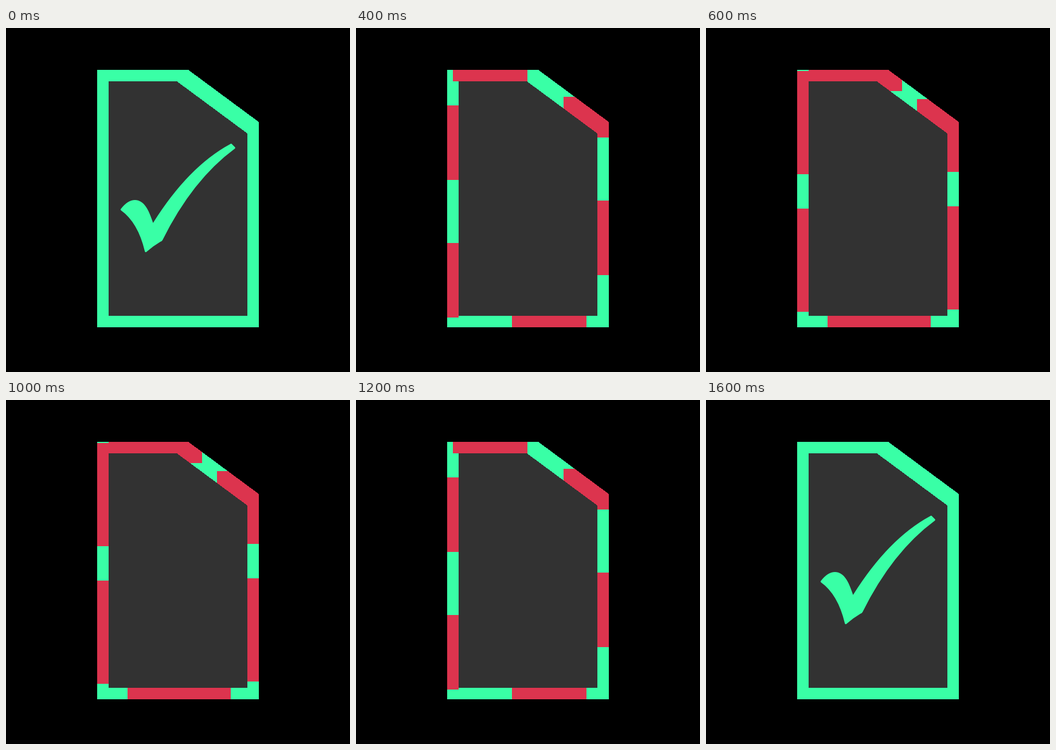
An HTML page with a canvas for the animation above (1.8 s loop, 600 by 600 pixels).

```html
<!DOCTYPE html>
<html lang="en">
<head>
<meta charset="utf-8">
<title>File check</title>
<style>
  html, body { margin: 0; width: 100%; height: 100%; overflow: hidden; background: #000; }
  canvas { display: block; }
</style>
</head>
<body>
<canvas id="stage" width="600" height="600"></canvas>
<script>
const ctx = document.getElementById('stage').getContext('2d');
const GREEN = '#39ffa6', RED = '#dc344e', PAPER = '#323232';
const STEP = 200, STEPS = 9, PERIOD = 240, BRUSH = 20;

const corners = [[169, 83], [308, 83], [431, 174], [431, 512], [169, 512], [169, 83]];

// Centre points of the outline, one per unit of horizontal plus vertical travel
const track = [];
for (let i = 0; i < corners.length - 1; i++) {
  const [x, y] = corners[i];
  const dx = corners[i + 1][0] - x, dy = corners[i + 1][1] - y;
  const n = Math.abs(dx) + Math.abs(dy);
  for (let j = 0; j < n; j++) {
    track.push([Math.round(x + dx * j / n), Math.round(y + dy * j / n)]);
  }
}

const tick = new Path2D(
  'M200 316 Q212 300 225 300 C240 300 249 316 256.500 340 Q318 242 391 202.500 ' +
  'Q393 201 394.500 203 L399.500 208 Q400.500 209.500 399 210.500 Q325 265 273 370 ' +
  'Q272 372 269 373 Q257 380 245 390.500 Q242.500 392 242 389 Q230 339 200.500 318 ' +
  'Q199.500 317 200 316 Z');

// Red stretch of each period as [start, end], from all green to all red
const dashes = [null, [0, 60], [10, 120], [20, 180], [0, PERIOD]];

function outline(color, dash) {
  ctx.fillStyle = color;
  track.forEach(([x, y], i) => {
    const p = i % PERIOD;
    if (p >= dash[0] && p <= dash[1]) {
      ctx.fillRect(x - BRUSH / 2, y - BRUSH / 2, BRUSH, BRUSH);
    }
  });
}

function draw(level) {
  ctx.fillStyle = '#000';
  ctx.fillRect(0, 0, 600, 600);
  ctx.fillStyle = PAPER;
  ctx.beginPath();
  corners.forEach(([x, y]) => ctx.lineTo(x, y));
  ctx.fill();
  outline(GREEN, [0, PERIOD]);
  if (level) {
    outline(RED, dashes[level]);
  } else {
    ctx.fillStyle = GREEN;
    ctx.fill(tick);
  }
}

let shown = -1;
function frame() {
  const k = Math.floor(performance.now() / STEP) % STEPS;
  const level = 4 - Math.abs(k - 4);
  if (level !== shown) draw(shown = level);
  requestAnimationFrame(frame);
}
frame();
</script>
</body>
</html>
```
